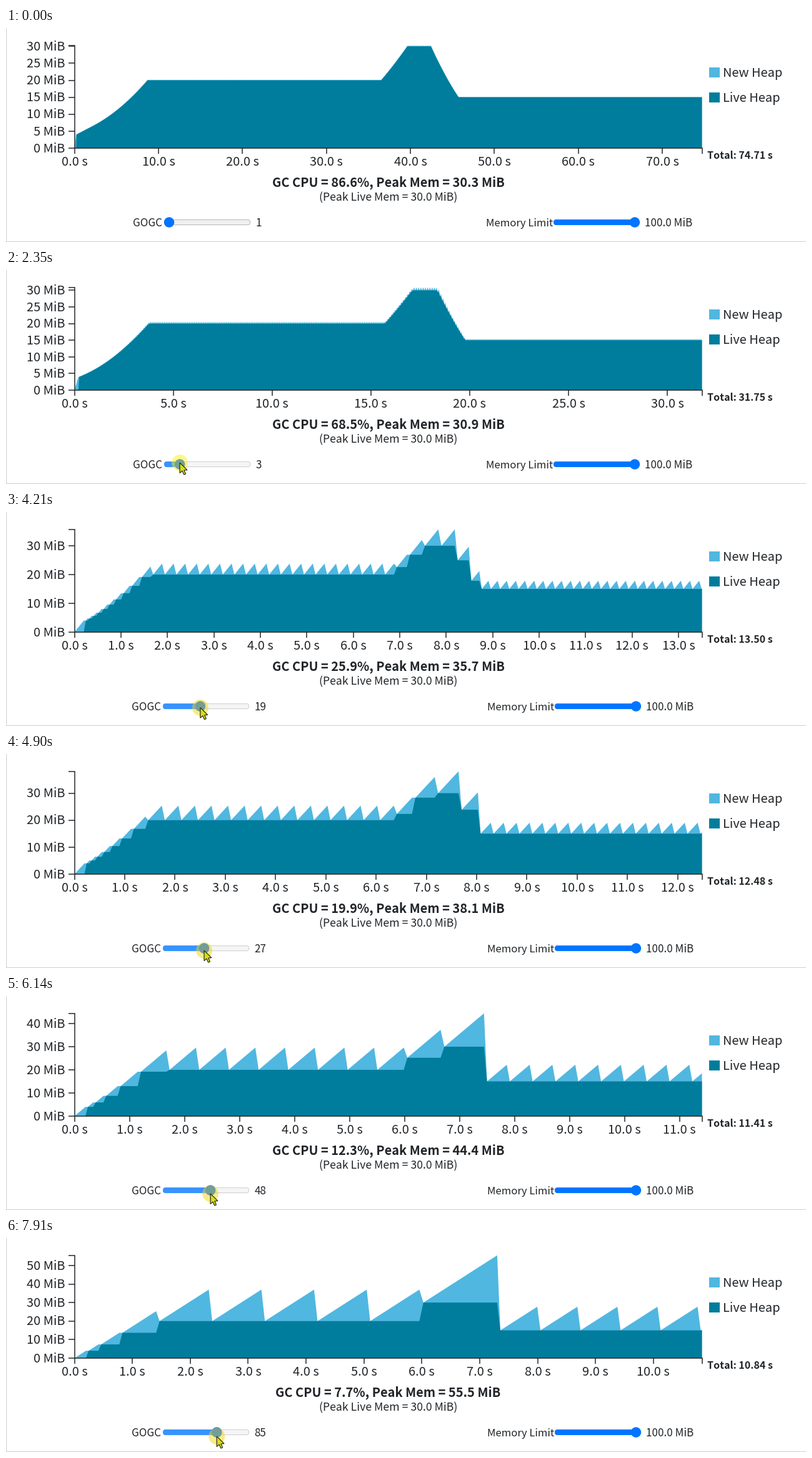
These frames come from a looping animation (1280x342 px, 8000 ms). A matplotlib script:

```python
import math

import matplotlib.pyplot as plt
import numpy as np
from matplotlib.animation import FuncAnimation
from matplotlib.patches import Circle, FancyBboxPatch, Polygon, Rectangle

W, H, DPI = 1280, 342, 64
LOOP_MS, STEP_MS = 8000, 80
LEFT, RIGHT, TOP, BASE = 109.5, 1113.5, 27.7, 192
INK, NEW, LIVE, BLUE = "#212529", "#50b7e0", "#007d9c", "#0075ff"
FONT = "Noto Sans CJK JP"

APP_SECONDS, ALLOC_RATE = 10, 20            # MiB allocated per second
FIRST_TRIGGER, MIN_GROWTH = 4, 1 / 16       # MiB
GC_FIXED, SCAN_RATE = 0.04, 1024

ENTER, PRESS, DRAG = 150, 1110, 1400
# Slider position over time; its level is log2 of the GOGC value
DRAG_KEYS = [(DRAG, 0), (2360, 1.4), (3360, 3.3), (4200, 4.25), (4920, 4.755),
             (6120, 5.58), (6680, 6), (7150, 6.3), (7880, 6.41)]

fig = plt.figure(figsize=(W / DPI, H / DPI), dpi=DPI, facecolor="white")
ax = fig.add_axes([0, 0, 1, 1])
ax.set(xlim=(0, W), ylim=(H, 0))
ax.axis("off")


def points(px):
    return px * 72 / DPI


def label(x, y, text, size=20, ha="left", weight="normal"):
    return ax.text(x, y, text, fontsize=points(size), ha=ha, va="baseline",
                   color=INK, family=FONT, weight=weight, zorder=4)


def line(xs, ys):
    return ax.plot(xs, ys, color=INK, lw=points(1.5), zorder=3,
                   solid_capstyle="butt", solid_joinstyle="miter")[0]


def shape(patch, z=2):
    patch.set_zorder(z)
    return ax.add_patch(patch)


def dot(x, color, z, alpha=1):
    return shape(Circle((x, 310.5), 8.2, fc=color, alpha=alpha, lw=0), z)


def pill(x0, x1, face, edge, z):
    box = FancyBboxPatch((x0 + 4.5, 310.5), x1 - x0 - 9, 0, lw=points(0.9),
                         boxstyle="round,pad=4.1,rounding_size=4.1",
                         fc=face, ec=edge)
    return shape(box, z)


def live_heap(app_time):
    return np.interp(app_time, [0, 1, 5, 5.5, 6, 6.5], [0, 20, 20, 30, 30, 15])


def simulate(gogc):
    """Return rows of (time, live heap, total heap) for one run."""
    app = clock = live = 0
    trigger = FIRST_TRIGGER
    rows = [(0, 0, 0)]
    while True:
        grow = (trigger - live) / ALLOC_RATE
        if app + grow >= APP_SECONDS:
            rest = APP_SECONDS - app
            rows.append((clock + rest, live, live + ALLOC_RATE * rest))
            return np.array(rows)
        app += grow
        clock += grow
        rows.append((clock, live, trigger))
        live = live_heap(app)
        clock += GC_FIXED + live / SCAN_RATE
        rows.append((clock, live, live))
        trigger = live + max(live * gogc / 100, MIN_GROWTH)


def ticks(top, count):
    """Multiples of 1, 2, 5 or 10 times a power of ten, about count of them."""
    power = 10 ** math.floor(math.log10(top / count))
    error = top / count / power
    factor = next(f for f, limit in [(1, 2), (2, 10), (5, 50), (10, 100)]
                  if error < limit ** 0.5)
    return np.arange(0, top + 1e-9, power * factor)


def area(xs, ys, color):
    outline = [(xs[0], BASE), *zip(xs, ys), (xs[-1], BASE)]
    return shape(Polygon(outline, fc=color, lw=0))


def draw_chart(gogc):
    time, live, heap = simulate(gogc).T
    total, peak = time[-1], heap.max()

    def px(t):
        return LEFT + (RIGHT - LEFT) * t / total

    def py(m):
        return BASE - (BASE - TOP) * m / peak

    parts = [area(px(time), py(heap), NEW), area(px(time), py(live), LIVE)]
    for m in ticks(peak, 5):
        parts += [line([100, LEFT], [py(m)] * 2),
                  label(94.5, py(m) + 6.7, f"{m:.0f} MiB", ha="right")]
    for t in ticks(total, 10):
        parts += [line([px(t)] * 2, [BASE, 201]),
                  label(px(t), 220, f"{t:.1f} s", ha="center")]
    share = 100 * (total - APP_SECONDS) / total
    parts += [
        label(1122, 209, f"Total: {total:.2f} s", 16, weight="bold"),
        label(611.5, 253.5, f"GC CPU = {share:.1f}%, Peak Mem = {peak:.1f} MiB",
              ha="center", weight="bold"),
        label(611.5, 276.5, f"(Peak Live Mem = {live.max():.1f} MiB)", 17.7, "center"),
    ]
    return parts


def slider_colors(t):
    if t >= PRESS:
        return "#3793ff", "#f5f5f5", "#cbcbcb"
    if t >= 900:
        return "#005cc8", "#e5e5e5", "#a0a0a0"
    return BLUE, "#efefef", "#b2b2b2"


def draw_controls(t, level, gogc):
    shift = 2 if gogc >= 10 else 0          # a wider number re-centres the row
    thumb = 261 - shift + 12.2 * level
    fill, track, border = slider_colors(t)
    parts = [
        label(203.5 - shift, 317, "GOGC", 17),
        pill(253 - shift, 391 - shift, track, border, 2),
        pill(253 - shift, max(thumb, 263 - shift), fill, fill, 3),
        dot(thumb, fill, 4),
        label(399.5 - shift, 317, f"{gogc}", 17),
        label(768 + shift, 317, "Memory Limit", 16.7),
        pill(876 + shift, 1012 + shift, BLUE, BLUE, 3),
        dot(1006 + shift, BLUE, 4),
        label(1022 + shift, 317, "100.0 MiB", 17),
    ]
    if t >= ENTER:
        parts += draw_cursor(t, level, thumb)
    return parts


def draw_cursor(t, level, thumb):
    if t < PRESS:
        u = (t - ENTER) / (PRESS - ENTER)
        left = (1 - u) ** 3
        x = 263.5 + 678 * left
        y = 304.5 + 31 * left - 14 * math.sin(math.pi * u)
    else:
        u = (t - PRESS) / (LOOP_MS - PRESS)
        x = thumb + 2.5 * max(0, 1 - level / 1.4)
        y = 304.5 + 12.5 * math.sin(math.pi / 2 * u)
    warm = min(level / 4.25, 1)
    halo = (1 - 0.05 * warm, 1 - 0.17 * warm, 0.1)
    parts = [shape(Circle((x, y), 13, fc=halo, alpha=0.5, lw=0), 5)]
    if t >= PRESS:
        parts.append(dot(thumb, "#6a9699", 6, 0.75))
    arrow = np.array([(0, 0), (0, 16.5), (3.9, 13), (6.6, 19), (9.4, 17.8),
                      (6.8, 12), (11.8, 11.6)])
    parts.append(shape(Polygon(arrow + (x, y), fc="#d4de1c", ec="#2b2b10",
                               lw=points(1.2), joinstyle="miter"), 7))
    return parts


def draw_fixed():
    shape(Rectangle((0, 0), 1, H, fc="#cfcfcf", lw=0))
    shape(Rectangle((0, H - 1), W, 1, fc="#cfcfcf", lw=0))
    line([100, LEFT, LEFT], [TOP, TOP, BASE])
    line([LEFT, RIGHT, RIGHT], [BASE, BASE, 201])
    for y, color, name in [(71, NEW, "New Heap"), (111, LIVE, "Live Heap")]:
        shape(Rectangle((1125, y - 8), 16.5, 16, fc=color, lw=0))
        label(1147, y + 7, name)


shown = {}


def refresh(name, draw, *args):
    """Redraw a named group only when its inputs change."""
    old_args, parts = shown.get(name, (None, []))
    if args != old_args:
        for part in parts:
            part.remove()
        shown[name] = (args, draw(*args))


def update(frame):
    t = (frame + 0.5) * STEP_MS
    level = np.interp(t, *zip(*DRAG_KEYS))
    gogc = round(2 ** level)
    refresh("chart", draw_chart, gogc)
    refresh("controls", draw_controls, t, level, gogc)
    return []


draw_fixed()
anim = FuncAnimation(fig, update, frames=LOOP_MS // STEP_MS, interval=STEP_MS,
                     init_func=lambda: [], repeat=True, repeat_delay=0)
plt.show()
```
